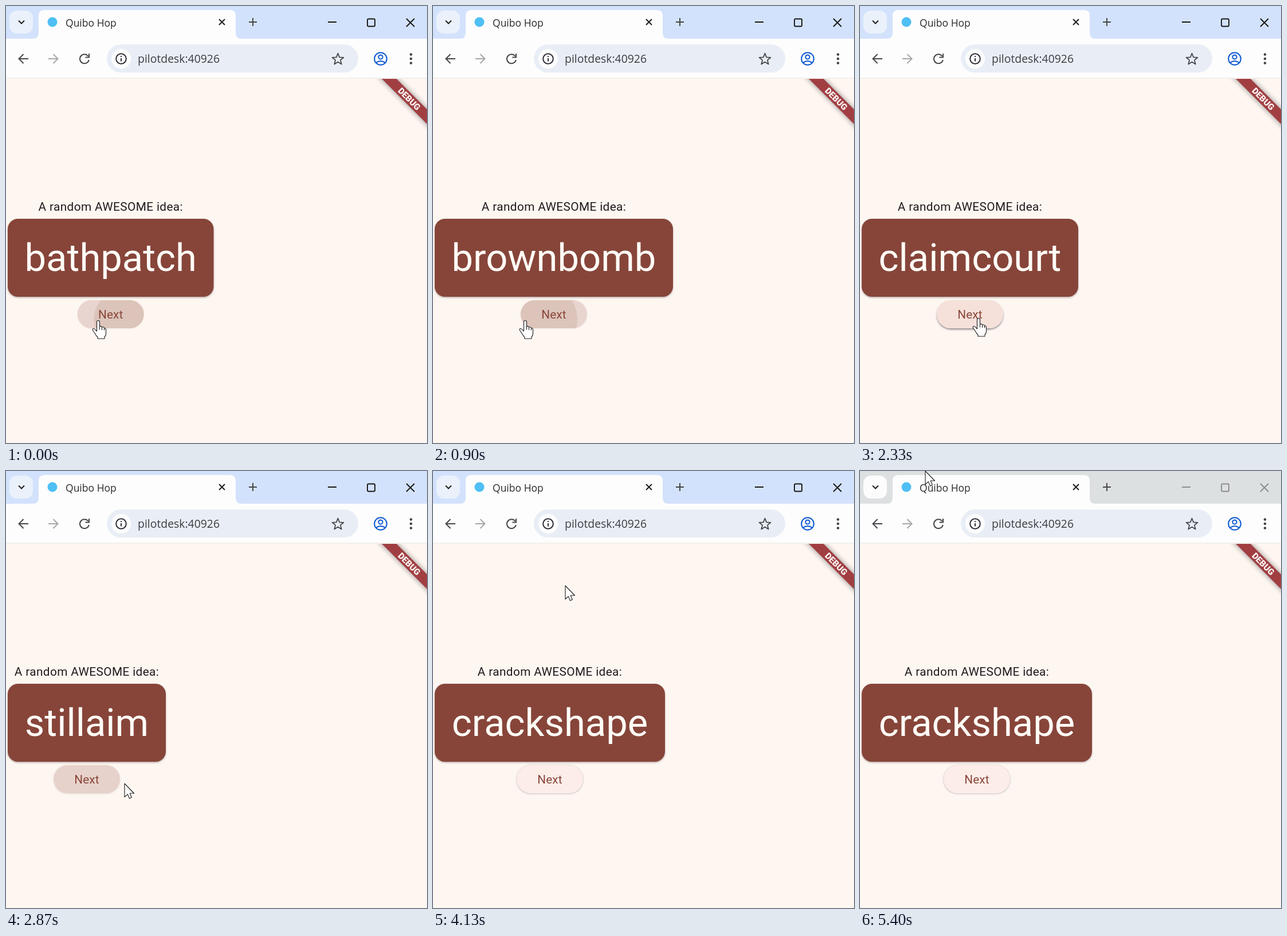
An HTML page that plays this animation: 735x762 px, repeating every 5.43 s.

```html
<!DOCTYPE html>
<html lang="en">
<head>
<meta charset="utf-8">
<title>Word pairs</title>
<style>
  html, body { margin: 0; width: 100%; height: 100%; overflow: hidden; background: #fdf6f1; }
  svg { display: block; width: 735px; height: 762px; }
  .chrome { font-family: "Open Sans", "Noto Sans", sans-serif; fill: #2b2b2d; }
  .app { font-family: Roboto, sans-serif; text-anchor: middle; }
  .icon { fill: none; stroke: #444649; stroke-width: 2; }
</style>
</head>
<body>
<svg viewBox="0 0 735 762">
  <defs>
    <filter id="soft" x="-20%" y="-40%" width="140%" height="180%"><feGaussianBlur stdDeviation="1.6"/></filter>
    <filter id="softer" x="-20%" y="-120%" width="140%" height="340%"><feGaussianBlur stdDeviation="5"/></filter>
    <clipPath id="page"><rect y="127" width="735" height="635"/></clipPath>
    <clipPath id="pill"><rect width="116" height="49" rx="24.5"/></clipPath>
  </defs>

  <rect id="titleBar" width="735" height="58"/>
  <rect id="tabSearch" x="6" y="8" width="41" height="40" rx="13"/>
  <path class="icon" d="M22 25.5l5 5 5-5" style="stroke:#1f1f1f"/>
  <path d="M47 57Q57 57 57 47V17Q57 7 67 7H391Q401 7 401 17V47Q401 57 411 57Z" fill="#fdfdfd"/>
  <circle cx="81" cy="28" r="8.5" fill="#4fbff5"/>
  <text class="chrome" x="104" y="36" font-size="17.5">Quibo Hop</text>
  <path class="icon" d="M372 23l10 10m0-10l-10 10" style="stroke:#1f1f1f"/>
  <path class="icon" d="M424 28h14m-7-7v14"/>
  <g id="controls" fill="none" stroke-width="1.9">
    <path d="M562 28h15M699 22l14 14m0-14l-14 14"/>
    <rect x="631" y="22.5" width="13" height="13" rx="2"/>
  </g>

  <rect y="57" width="735" height="69" fill="#fdfdfd"/>
  <path class="icon" d="M39 92H23m7.5-8l-8 8 8 8"/>
  <path class="icon" d="M74 92h16m-7.5-8l8 8-8 8" style="stroke:#a6a7a7"/>
  <path class="icon" d="M143.5 87.5a8 8 0 1 0 1.3 6.5M145 83v6.5h-6.5"/>
  <rect x="176" y="67" width="439" height="49" rx="24.5" fill="#e9eef6"/>
  <circle cx="201" cy="92" r="17" fill="#fdfdfd"/>
  <circle class="icon" cx="201" cy="92" r="8.8" style="stroke:#2d2d36"/>
  <path class="icon" d="M201 91v5.5m0-9.5v2" style="stroke:#2d2d36"/>
  <text class="chrome" x="230" y="99" font-size="19.4" style="fill:#3c3d42">pilotdesk:40926</text>
  <path id="star" class="icon" stroke-linejoin="round" style="stroke-width:1.8"/>
  <g class="icon" style="stroke:#0b57d0">
    <circle cx="654" cy="92" r="10.8"/>
    <circle cx="654" cy="89" r="3.6"/>
    <path d="M646 99q8-6 16 0"/>
  </g>
  <path d="M707 84.5h.01m0 7.5h.01m0 7.5h.01" stroke="#444649" stroke-width="4.6" stroke-linecap="round"/>

  <rect y="126" width="735" height="636" fill="#fdf6f1"/>
  <rect y="125" width="735" height="1" fill="#e9e9e6"/>
  <g clip-path="url(#page)">
    <g transform="translate(704 162) rotate(45)">
      <rect x="-90" y="-9" width="180" height="18" fill="#1c1418" opacity=".5" filter="url(#softer)"/>
      <rect x="-90" y="-9" width="180" height="18" fill="#a13e42"/>
      <text class="app" y="5.3" font-size="15.1" font-weight="900" fill="#fff6f4">DEBUG</text>
    </g>
  </g>

  <text id="caption" class="app" y="357" font-size="20.8" letter-spacing=".37" fill="#231a1c">A random AWESOME idea:</text>
  <rect class="card" x="3" y="372.5" height="136" rx="18" fill="#4c3a38" opacity=".4" filter="url(#soft)"/>
  <rect class="card" x="3" y="371" height="136" rx="18" fill="#87453a"/>
  <text id="word" class="app" y="462" font-size="66.9" fill="#fffcf6"></text>

  <g id="button">
    <rect id="shadow" width="116" height="49" rx="24.5" fill="#4f4650" filter="url(#soft)"/>
    <rect width="116" height="49" rx="24.5" fill="#fcede9"/>
    <g clip-path="url(#pill)">
      <rect id="hover" width="116" height="49" fill="#f5e0da"/>
      <rect id="press" width="116" height="49" fill="#e9d5cf"/>
      <circle id="ripple" cy="33" fill="#8f5c3c"/>
    </g>
    <text class="app" x="58" y="32" font-size="20.8" letter-spacing=".15" fill="#8a4639">Next</text>
  </g>

  <g id="cursor" fill="#fff" stroke="#1c1c1c" stroke-width="1.1" stroke-linejoin="round">
    <path id="arrow" d="M0 0V23.5L5.3 18.6 8.5 26 12.3 24.3 9.2 17H16.5Z"/>
    <path id="hand" d="M-2.5 2a2.5 2.5 0 0 1 5 0v8q2.500-1.500 4 1q3-1 4 1.500q3 0 3 3v7q0 3-2.500 5.500v3h-12v-2.500q-3-3-5-7l-3.500-5q-1-3 1.500-3q2 0 3.500 2.500l2 2zM2.500 10v5.500M6.500 11v5M10.500 12.500v4"/>
  </g>
</svg>
<script>
const LOOP = 5430;
const BLUR_AT = 5270;
const $ = id => document.getElementById(id);
const set = (el, attrs) => { for (const k in attrs) el.setAttribute(k, attrs[k]); };
const clamp = v => Math.max(0, Math.min(1, v));
const ramp = (t, from, to) => clamp((t - from) / (to - from));
const easeOut = u => 1 - (1 - u) ** 2;
const smooth = u => u * u * (3 - 2 * u);

// word, start time, right edge of the card
const words = [
  ["bathpatch", 0, 362.5],
  ["brownbomb", 830, 419],
  ["claimcourt", 1790, 381],
  ["stillaim", 2690, 279],
  ["crackshape", 3340, 405],
];
// press time, release time, touch x inside the button
const clicks = [[-141, -41, 79], [730, 830, 37], [1675, 1790, 54], [2580, 2690, 73], [3230, 3340, 97]];
const hovers = [[-1000, 2690], [2970, 3650]];
// time, x, y of the pointer tip
const path = [
  [0, 161, 549], [1170, 161, 549], [1560, 207, 545], [2900, 207, 545], [3080, 180, 542],
  [3560, 180, 542], [4080, 231, 200], [4250, 231, 200], [4560, 150, 30], [5100, 114, 0], [LOOP, 114, 0],
];

function starPath(cx, cy, outer, inner) {
  const points = Array.from({ length: 10 }, (_, i) => {
    const r = i % 2 ? inner : outer, a = Math.PI * (i / 5 - 0.5);
    return (cx + r * Math.cos(a)).toFixed(1) + " " + (cy + r * Math.sin(a)).toFixed(1);
  });
  return "M" + points.join("L") + "Z";
}

function pointerAt(t) {
  const i = path.findIndex(p => p[0] > t);
  const [t0, x0, y0] = path[i - 1], [t1, x1, y1] = path[i];
  const u = smooth(ramp(t, t0, t1));
  return [x0 + (x1 - x0) * u, y0 + (y1 - y0) * u];
}

function drawButton(t, center) {
  const [down, up, x] = clicks.filter(c => c[0] <= t).pop();
  const hover = Math.max(...hovers.map(([a, b]) => ramp(t, a, a + 150) * (1 - ramp(t, b, b + 150))));
  const press = ramp(t, down + 20, down + 120) * (1 - ramp(t, up + 100, up + 300));
  const lift = hover * (1 - press);
  set($("button"), { transform: `translate(${center - 58} 513)` });
  set($("shadow"), { y: 0.6 + 1.6 * lift, opacity: (0.4 + 0.2 * lift) * (1 - 0.85 * press) });
  set($("hover"), { opacity: hover });
  set($("press"), { opacity: press });
  set($("ripple"), {
    cx: x,
    r: 18 + 12 * ramp(t, down, down + 110) + 60 * easeOut(ramp(t, up, up + 225)),
    opacity: 0.14 * ramp(t, down, down + 40) * (1 - ramp(t, up + 80, up + 375)),
  });
}

function drawWindow(active) {
  set($("titleBar"), { fill: active ? "#d3e2fc" : "#dde0e1" });
  set($("tabSearch"), { fill: active ? "#eaf1fb" : "#fcfcfc" });
  set($("controls"), { stroke: active ? "#161616" : "#8b8b8b" });
}

function draw(t) {
  const [word, , right] = words.filter(w => w[1] <= t).pop();
  const center = (3 + right) / 2;
  document.querySelectorAll(".card").forEach(el => set(el, { width: right - 3 }));
  $("word").textContent = word;
  set($("word"), { x: center });
  set($("caption"), { x: center });
  drawButton(t, center);
  drawWindow(t < BLUR_AT);

  const [x, y] = pointerAt(t);
  const over = hovers.some(([a, b]) => t >= a && t < b);
  set($("cursor"), { transform: `translate(${x} ${y})` });
  set($("hand"), { visibility: over ? "visible" : "hidden" });
  set($("arrow"), { visibility: over ? "hidden" : "visible" });
}

set($("star"), { d: starPath(579.5, 93, 10.5, 4.6) });

const start = performance.now();
function tick() {
  draw((performance.now() - start) % LOOP);
  requestAnimationFrame(tick);
}
tick();
</script>
</body>
</html>
```
